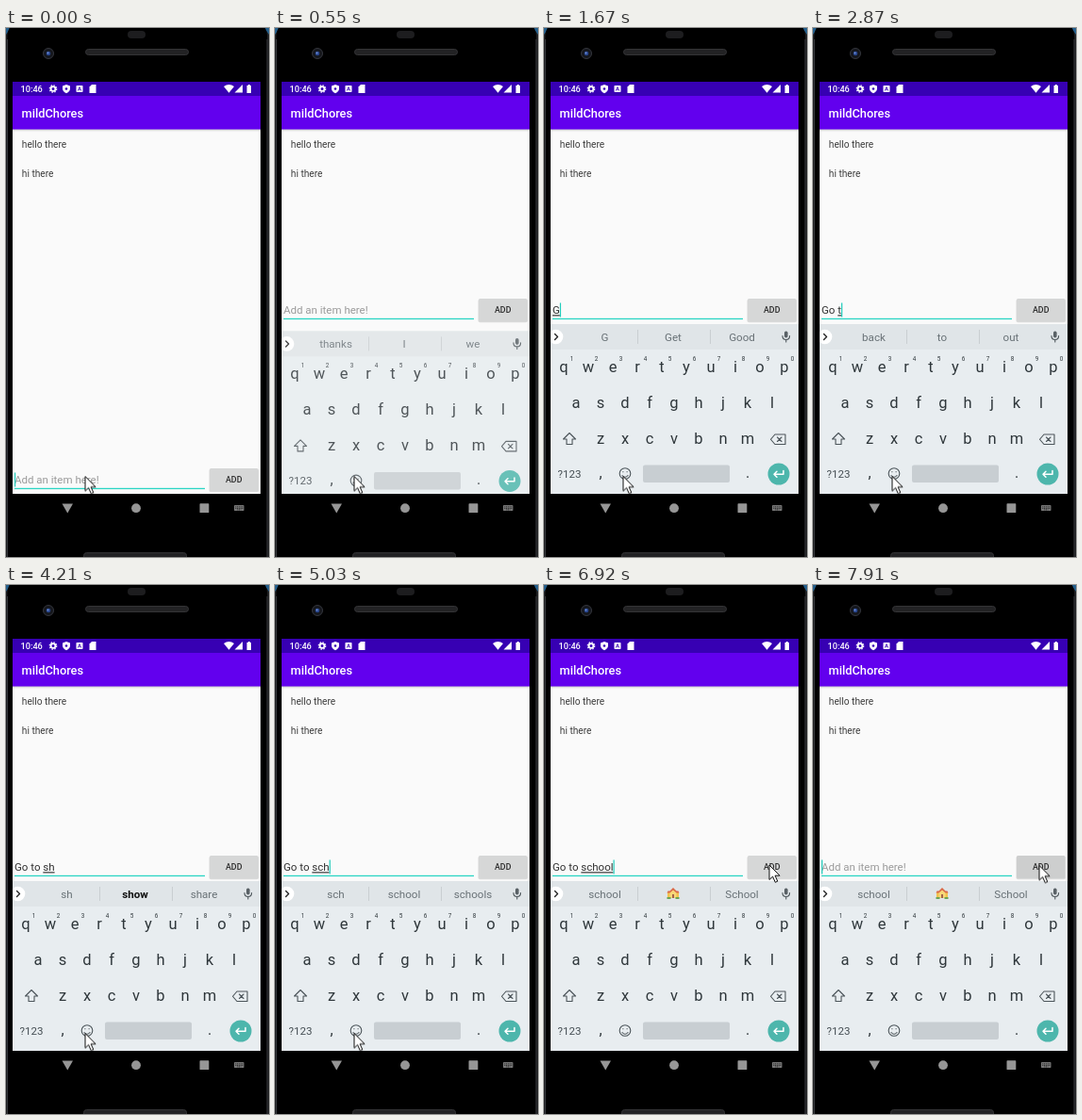
These frames come from a looping animation (279x561 px, 8000 ms). An HTML page:

```html
<!DOCTYPE html>
<html lang="en">
<head>
<meta charset="utf-8">
<title>To-do app</title>
<style>
  html, body { margin: 0; width: 100%; height: 100%; overflow: hidden; background: #000; }
  svg { display: block; width: 100vw; height: 100vh; }
  text { font-family: Roboto, sans-serif; white-space: pre; }
  .mid { text-anchor: middle; }
  .medium { font-weight: 500; }
  .line { fill: none; stroke: #4c555a; stroke-width: 1.1; stroke-linejoin: round; stroke-linecap: round; }
  #keys text { fill: #2f373b; }
  #bar, #keyboard, #pointer, #ripple { animation: 8s linear infinite; }
  #bar { animation-name: lift; }
  #keyboard { animation-name: rise; }
  #pointer { animation-name: travel; }
  #ripple { animation-name: press; }
  @keyframes lift {
    0%, 4.99% { transform: none; }
    5%, 100% { transform: translateY(-180px); }
  }
  @keyframes rise {
    0%, 4.99% { transform: translateY(27px); opacity: 0; }
    5% { transform: translateY(27px); opacity: .4; animation-timing-function: ease-out; }
    8.5%, 100% { transform: none; opacity: 1; }
  }
  @keyframes travel {
    0%, 76.2% { transform: translate(84px, 475.5px); animation-timing-function: ease-in-out; }
    82.8% { transform: translate(233px, 280px); animation-timing-function: ease-out; }
    86.5% { transform: translate(239px, 297px); }
    89.7%, 100% { transform: translate(240px, 297.5px); }
  }
  @keyframes press {
    0%, 93.1% { transform: scale(.3); opacity: 0; }
    93.12% { transform: scale(.3); opacity: .12; }
    95%, 98.8% { transform: scale(1); opacity: .12; }
    98.87%, 100% { transform: scale(1); opacity: .04; }
  }
</style>
</head>
<body>
<svg viewBox="0 0 279 561" preserveAspectRatio="none">
  <defs>
    <linearGradient id="shade" x2="0" y2="1">
      <stop stop-color="#000" stop-opacity=".2"/><stop offset="1" stop-color="#000" stop-opacity="0"/>
    </linearGradient>
    <clipPath id="screen"><rect x="7" y="57" width="263" height="437"/></clipPath>
    <clipPath id="buttonShape"><rect x="216" y="467" width="51.5" height="24" rx="1.5"/></clipPath>
  </defs>

  <!-- phone body -->
  <rect width="279" height="561" fill="#1c1d1f"/>
  <path d="M0 0h5L0 7zM279 0h-5l5 7z" fill="#245f8c"/>
  <rect x="1.5" y="-8" width="275.5" height="590" rx="16"/>
  <path d="M1.5 12V561M277 12V561" stroke="#34363a" fill="none"/>
  <rect x="129" y="3" width="19" height="8" rx="4" fill="#1d1d1f"/>
  <rect x="84.500" y="22.500" width="109" height="6" rx="3" fill="#222224" stroke="#343436"/>
  <rect x="82.500" y="556.500" width="109" height="8" rx="3" fill="#222224" stroke="#343436"/>
  <circle cx="45" cy="27" r="5.5" fill="#15171d" stroke="#34363c"/>
  <circle cx="45" cy="27" r="2.3" fill="#29478f"/>
  <circle cx="44.500" cy="26.500" r=".9" fill="#7695db"/>

  <!-- app -->
  <rect x="7" y="57" width="263" height="437" fill="#fafafa"/>
  <rect x="7" y="107" width="263" height="3" fill="url(#shade)"/>
  <rect x="7" y="57" width="263" height="15" fill="#3700b3"/>
  <rect x="7" y="72" width="263" height="35.500" fill="#6200ee"/>
  <g fill="#fff">
    <text class="medium" x="15.500" y="68" font-size="9.2">10:46</text>
    <circle cx="50" cy="64.500" r="2.400" fill="none" stroke="#fff" stroke-width="1.800"/>
    <circle cx="50" cy="64.500" r="3.700" fill="none" stroke="#fff" stroke-width="1.300" stroke-dasharray="1.450"/>
    <path d="M64 60l4 1.500v2.800q0 3.200-4 5-4-1.800-4-5v-2.800z"/>
    <circle cx="64" cy="64.500" r="1.300" fill="#3700b3"/>
    <rect x="74.500" y="61" width="7" height="7" rx=".8"/>
    <path d="M76.300 66.500l1.700-4 1.700 4m-2.700-1.300h2" fill="none" stroke="#3700b3" stroke-width=".8"/>
    <path d="M91 60h4.500v9h-7v-6.500z"/>
    <path d="M231 62q5.500-4 11 0l-5.500 6.700zM251 60v8.500h-8.500zM255.500 61h1.300v-1h2v1h1.200v8h-4.500z"/>
    <text class="medium" x="16.500" y="94.500" font-size="12.800">mildChores</text>
  </g>
  <g font-size="10.200" fill="#3d3d3d">
    <text x="16.800" y="127">hello there</text>
    <text x="16.800" y="158">hi there</text>
  </g>

  <g id="bar">
    <text id="hint" x="9" y="483.300" font-size="11.500" fill="#9b9b9b">Add an item here!</text>
    <text id="entry" x="9" y="483.300" font-size="11.500" fill="#303030"><tspan></tspan><tspan text-decoration="underline"></tspan></text>
    <rect x="9" y="487.800" width="202" height="1.300" fill="#2bd5c4"/>
    <rect id="caret" x="9" y="471.500" width="1.200" height="15" fill="#22cdbc"/>
    <rect x="215.500" y="467.500" width="52.500" height="24.700" rx="2" opacity=".13"/>
    <rect x="216" y="467" width="51.500" height="24" rx="1.500" fill="#d6d7d7"/>
    <g clip-path="url(#buttonShape)"><g transform="translate(241.500 479)"><circle id="ripple" r="32"/></g></g>
    <text class="mid medium" x="241.700" y="482" font-size="8.900" fill="#2b2b2b">ADD</text>
  </g>

  <g clip-path="url(#screen)"><g id="keyboard">
    <rect x="7" y="314" width="263" height="181" fill="#e8edf0"/>
    <rect x="7" y="314" width="263" height="27" fill="#e0e5e8"/>
    <circle cx="12.500" cy="327.500" r="7.800" fill="#fff"/>
    <path d="M11.500 324.500l3 3-3 3" class="line" style="stroke:#222;stroke-width:1.400"/>
    <path d="M99.500 320v15M176.500 320v15" stroke="#c9ced1"/>
    <g id="suggestions" class="mid" font-size="11.600">
      <text x="64.500" y="331.700"/><text x="137" y="331.700"/><text x="210" y="331.700"/>
    </g>
    <g id="school">
      <path d="M131 326h12v6h-12z" fill="#f2c14e"/>
      <path d="M133.500 324.500l3.500-3 3.500 3v7.500h-7z" fill="#f7d878"/>
      <path d="M130.500 326.500l1-2h2l3.500-3.500 3.500 3.500h2l1 2h-3l-3.500-3-3.500 3z" fill="#d9674b"/>
      <path d="M136 328h2v4h-2z" fill="#a5644a"/>
      <path d="M130.500 331h4v2h-4zm9 0h4v2h-4z" fill="#6da553"/>
    </g>
    <rect x="255" y="321.500" width="3.600" height="7" rx="1.800" fill="#596166"/>
    <path d="M253 326.500q0 4 3.800 4t3.800-4m-3.800 4v2.500" class="line"/>

    <g id="keys" class="mid"></g>
    <text class="mid" x="27" y="476.800" font-size="11.500" fill="#454e53">?123</text>
    <path d="M27 429.500l6.500 6.500h-3.500v5.500h-6v-5.500h-3.500z" class="line"/>
    <path d="M245 431h11v10.500h-11l-4.500-5.250zM247.500 434l4.500 4.500m0-4.500l-4.500 4.500" class="line"/>
    <g class="line"><circle cx="86" cy="472.500" r="5.800"/><path d="M83 474.500q3 3.400 6 0M83.900 470.600v.2M88.100 470.600v.2"/></g>
    <rect x="105" y="463.500" width="92" height="18.500" rx="2" fill="#c8ced2"/>
    <circle cx="249" cy="473" r="11.500" fill="#4db6ac"/>
    <path d="M254 469.500v3.800h-10m3-3l-3 3 3 3" class="line" style="stroke:#fff;stroke-width:1.500"/>
  </g></g>

  <!-- navigation -->
  <g fill="#969696">
    <path d="M59.500 504.500h11.500l-5.750 10z"/>
    <circle cx="138" cy="509.200" r="4.900"/>
    <rect x="205.500" y="504.300" width="9.800" height="9.800" rx=".7"/>
    <rect x="242" y="506" width="10.500" height="6" rx=".7" fill="#777"/>
    <path d="M243.300 507.800h8m-8 1.600h8m-6 1.500h4" stroke="#111" stroke-width=".8" stroke-dasharray="1 .75"/>
  </g>

  <path id="pointer" d="M0 0v15.500l3.600-3.400 2.700 6.200 2.500-1.100-2.700-6h5z" fill="#fff" stroke="#111" stroke-width="1"/>
</svg>

<script>
const LOOP = 8000, BLINK = 500;

const edits = [
  [0, ""], [840, ""], [1390, "G"], [2440, "Go"], [2720, "Go "], [2870, "Go t"],
  [3130, "Go to"], [3280, "Go to "], [3530, "Go to s"], [3670, "Go to sh"],
  [4360, "Go to s"], [4620, "Go to sc"], [4900, "Go to sch"], [5280, "Go to scho"],
  [5540, "Go to schoo"], [5680, "Go to school"], [7910, ""]
];

// "*" marks the bold autocorrect choice, "@" the school picture
const offers = [
  [0, "thanks I we"], [1520, "G Get Good"], [2570, "Go Going Good"], [2720, "back to out"],
  [3000, "t to the"], [3280, "the sleep bed"], [3530, "s so see"], [3800, "sh *show share"],
  [4490, "s so say"], [4750, "sc school schedule"], [5030, "sch school schools"],
  [5410, "scho school schools"], [5980, "school @ School"]
];

const $ = id => document.getElementById(id);
const latest = (list, t) => list.findLast(item => item[0] <= t);

function addLabel(x, y, size, label) {
  const node = document.createElementNS("http://www.w3.org/2000/svg", "text");
  node.setAttribute("x", x);
  node.setAttribute("y", y);
  node.setAttribute("font-size", size);
  node.textContent = label;
  $("keys").append(node);
}

function addRow(letters, x, y) {
  [...letters].forEach((letter, i) => addLabel(x + i * 26, y, 16.5, letter));
}

addRow("qwertyuiop", 21, 365);
addRow("asdfghjkl", 34, 403);
addRow("zxcvbnm", 60, 441);
addLabel(60, 477, 16, ",");
addLabel(216, 477, 16, ".");
[..."1234567890"].forEach((digit, i) => addLabel(29.5 + i * 26, 353, 6.3, digit));

const entry = $("entry");
const [typed, composing] = entry.children;
const slots = [...$("suggestions").children];

function render(t) {
  const [since, text] = latest(edits, t);
  const word = text.match(/\S*$/)[0];
  typed.textContent = text.slice(0, text.length - word.length);
  composing.textContent = word;
  $("hint").style.display = text ? "none" : "";
  $("caret").setAttribute("x", 9 + (text ? entry.getComputedTextLength() : 0));
  $("caret").style.display = Math.floor((t - since) / BLINK) % 2 ? "none" : "";

  const words = latest(offers, t)[1].split(" ");
  slots.forEach((slot, i) => {
    const strong = words[i][0] === "*";
    slot.textContent = words[i].replace(/[*@]/, "");
    slot.setAttribute("fill", strong ? "#111" : "#687176");
    slot.setAttribute("font-weight", strong ? 700 : 400);
  });
  $("school").style.display = words[1] === "@" ? "" : "none";
}

let start;
function tick(now) {
  start ??= now;
  render((now - start) % LOOP);
  requestAnimationFrame(tick);
}
render(0);
requestAnimationFrame(tick);
</script>
</body>
</html>
```
